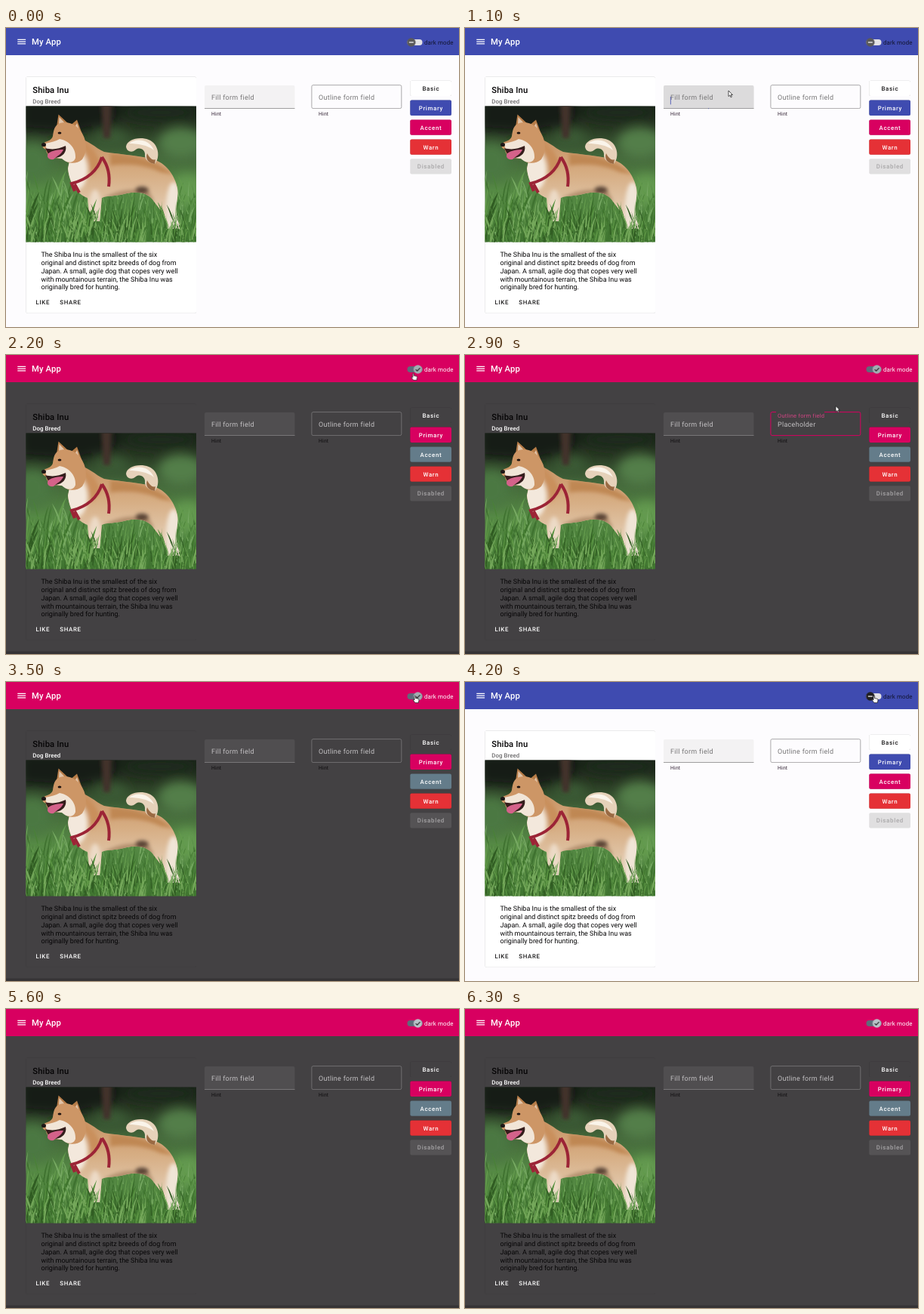
An HTML page that plays this animation: 600x396 px, repeating every 6400 ms.

```html
<!DOCTYPE html>
<html lang="en">
<head>
<meta charset="utf-8">
<title>My App</title>
<style>
html, body { margin: 0; width: 100%; height: 100%; overflow: hidden; }
svg { display: block; width: 600px; height: 396px; font-family: Roboto, sans-serif; text-rendering: geometricPrecision; }
svg, svg * { animation-duration: 6400ms; animation-iteration-count: infinite; animation-timing-function: linear; }
#app { animation-name: theme; animation-timing-function: step-end; }

@keyframes theme {
  0%, 57.8125% {
    --bar: #3f4bb0; --page: #fdfcfe; --edge: #fdfcfe; --card: #fff; --shade: rgba(0,0,0,.3); --sub: #6f6e6f; --act: #1c1b1c;
    --toggle-text: #12152f; --track: #e3e2e6; --minus: 1; --check: 0;
    --fill: #f3f2f3; --hover: #dcdbdc; --line: #969596; --label: #777677; --hint: #2a1a2c;
    --primary: #3f4bb0; --accent: #d80060; --off: #e0dfe0; --off-text: #a8a7a8;
  }
  29.6875%, 68.75% {
    --bar: #d80060; --page: #434143; --edge: #363436; --card: #434143; --shade: rgba(0,0,0,.2); --sub: #fff; --act: #fff;
    --toggle-text: #fff; --track: #5f6b7a; --minus: 0; --check: 1;
    --fill: #504e50; --hover: #5a585a; --line: #7d7b7d; --label: #c3c1c3; --hint: #0c0b0c;
    --primary: #d80060; --accent: #647c8a; --off: #555355; --off-text: #a6a4a6;
  }
}

.bar { fill: var(--bar); }
.page { fill: var(--page); }
.edge { fill: var(--edge); }
.card { fill: var(--card); filter: drop-shadow(0 .8px .6px var(--shade)); }
.h { font-size: 11.25px; font-weight: 500; letter-spacing: .14px; fill: #060506; }
.sub { font-size: 7.875px; font-weight: 500; letter-spacing: .056px; fill: var(--sub); }
.copy { font-size: 9px; fill: #060506; }
.btn { font-size: 7.875px; font-weight: 500; letter-spacing: .7px; fill: #fff; }
.btn rect { filter: drop-shadow(0 .8px .6px rgba(0,0,0,.32)); }
.btn text { text-anchor: middle; }
.act { fill: var(--act); }
.primary { fill: var(--primary); }
.accent { fill: var(--accent); }
.btn .off { fill: var(--off); filter: none; }
.off-text { fill: var(--off-text); }
.hint { font-size: 6.75px; letter-spacing: .22px; fill: var(--hint); }
.input { font-size: 9px; letter-spacing: .28px; fill: var(--label); }

.toggle-text { font-size: 7.875px; letter-spacing: .14px; fill: var(--toggle-text); }
.track { fill: var(--track); }
.thumb { animation-name: slide; }
.thumb circle { animation-name: thumb; animation-timing-function: step-end; }
.minus { opacity: var(--minus); }
.check { opacity: var(--check); }
@keyframes slide {
  0%, 29.6% { transform: translate(536.8px, 19px); }
  31.25%, 57.75% { transform: translate(545.5px, 19px); }
  59.375%, 68.7% { transform: translate(536.8px, 19px); }
  70.3125%, 100% { transform: translate(545.5px, 19px); }
}
@keyframes thumb {
  0% { fill: #5a595a; }
  26.5625% { fill: #201f22; }
  29.6875% { fill: #a3adb2; }
  57.8125% { fill: #201f22; }
  68.75% { fill: #b8c3c8; }
}

.fill-bg { fill: var(--fill); }
.fill-hover { fill: var(--hover); animation-name: hover; }
.rest-line { stroke: var(--line); fill: none; }
.ink { transform-box: fill-box; transform-origin: center; fill: #3f4bb0; animation-name: ink; }
.fill-label { animation-name: float-fill; }
.fill-label text { animation-name: tint-fill; }
.fill-caret { fill: #3f4bb0; animation-name: caret-fill; animation-timing-function: step-end; }
.fill-ph { animation-name: ph-fill; }
@keyframes hover { 0%, 14.4% { opacity: 0; } 15.625%, 21.875% { opacity: 1; } 23.4375%, 100% { opacity: 0; } }
@keyframes ink {
  0%, 17.1875% { transform: scaleX(0); opacity: 1; }
  20%, 28.2% { transform: scaleX(1); opacity: 1; }
  29.6%, 100% { transform: scaleX(1); opacity: 0; }
}
@keyframes float-fill {
  0%, 17.1875% { transform: translate(272px, 94.6px); }
  19.53%, 27.11% { transform: translate(272px, 86.5px) scale(.75); }
  29.45%, 100% { transform: translate(272px, 94.6px); }
}
@keyframes tint-fill {
  0%, 17.1875% { fill: var(--label); }
  19.53%, 27.11% { fill: #3f4bb0; }
  28.1%, 100% { fill: var(--label); }
}
@keyframes caret-fill { 0% { opacity: 0; } 17.1875% { opacity: 1; } 25% { opacity: 0; } }
@keyframes ph-fill { 0%, 18% { opacity: 0; } 20%, 26.9% { opacity: 1; } 28%, 100% { opacity: 0; } }

.rest-box { animation-name: rest-box; animation-timing-function: step-end; }
.focus-box { stroke: #d80060; fill: none; animation-name: focus-box; animation-timing-function: step-end; }
.out-label { animation-name: float-out; }
.out-label text { animation-name: tint-out; }
.out-caret { fill: #d80060; animation-name: focus-caret; animation-timing-function: step-end; }
.out-ph { animation-name: ph-out; }
@keyframes rest-box { 0% { opacity: 1; } 40.625% { opacity: 0; } 46.875% { opacity: 1; } }
@keyframes focus-box { 0% { opacity: 0; } 40.625% { opacity: 1; } 46.875% { opacity: 0; } }
@keyframes focus-caret { 0% { opacity: 0; } 40.625% { opacity: 1; } 44.5% { opacity: 0; } }
@keyframes float-out {
  0%, 39.0625% { transform: translate(414px, 94.6px); }
  41.4%, 44.5% { transform: translate(414px, 77.2px) scale(.75); }
  46.84%, 100% { transform: translate(414px, 94.6px); }
}
@keyframes tint-out {
  0%, 39.0625% { fill: var(--label); }
  41.4%, 44.5% { fill: #d80060; }
  46.84%, 100% { fill: var(--label); }
}
@keyframes ph-out { 0%, 39.5% { opacity: 0; } 41.4%, 45.4% { opacity: 1; } 46.8%, 100% { opacity: 0; } }

.cursor { animation-name: move; animation-timing-function: ease-in-out; }
.cursor path { fill: #fff; stroke: #111; stroke-width: .7; stroke-linejoin: round; animation-timing-function: step-end; }
.arrow { animation-name: arrow; }
.hand { animation-name: hand; }
@keyframes move {
  0%, 9.375% { transform: translate(400px, -14px); }
  15.625%, 20.3125% { transform: translate(349px, 83px); }
  26.5625%, 33% { transform: translate(546px, 15.5px); }
  39.0625%, 41% { transform: translate(478px, 92px); }
  44%, 46.875% { transform: translate(491px, 67.5px); }
  54.6875%, 70.3125% { transform: translate(541px, 18px); }
  76.5625%, 100% { transform: translate(530px, -16px); }
}
@keyframes arrow { 0% { opacity: 1; } 25.6% { opacity: 0; } 34.6% { opacity: 1; } 54% { opacity: 0; } 72.4% { opacity: 1; } }
@keyframes hand { 0% { opacity: 0; } 25.6% { opacity: 1; } 34.6% { opacity: 0; } 54% { opacity: 1; } 72.4% { opacity: 0; } }
</style>
</head>
<body>
<svg id="app" viewBox="0 0 600 396">
  <defs>
    <clipPath id="frame"><rect x="26.5" y="103.5" width="225.5" height="180"/></clipPath>
    <filter id="soft" x="-50%" y="-50%" width="200%" height="200%"><feGaussianBlur stdDeviation="7"/></filter>
    <filter id="fuzz" x="-30%" y="-30%" width="160%" height="160%"><feGaussianBlur stdDeviation="2.4"/></filter>
    <filter id="fur" x="-10%" y="-10%" width="120%" height="120%"><feGaussianBlur stdDeviation=".6"/></filter>
    <linearGradient id="woods" x2="0" y2="1">
      <stop stop-color="#182016"/><stop offset=".16" stop-color="#273722"/><stop offset=".36" stop-color="#43663a"/>
      <stop offset=".62" stop-color="#568a45"/><stop offset="1" stop-color="#3f7430"/>
    </linearGradient>
    <linearGradient id="coat" x2="0" y2="1">
      <stop stop-color="#c89263"/><stop offset=".4" stop-color="#d6ad83"/><stop offset=".7" stop-color="#e0c4a6"/><stop offset="1" stop-color="#e9dccb"/>
    </linearGradient>
    <clipPath id="body"><path d="M90 148C106 144 116 158 130 164C155 168 180 169 198 175C214 181 224 197 227 212C229 226 223 236 226 248L233 266H214C213 248 203 240 194 227C187 219 176 216 160 219C146 223 133 222 127 225L124 256H111L108 225C94 220 84 206 82 186Z"/></clipPath>
  </defs>

  <rect class="page" width="600" height="396"/>
  <rect class="edge" y="392.5" width="600" height="3.5"/>
  <rect class="bar" width="600" height="36"/>
  <path d="M15.3 15.3h10.8M15.3 18.1h10.8M15.3 20.9h10.8" stroke="#fff" stroke-width="1.2"/>
  <text class="h" x="34" y="22.2" style="fill:#fff">My App</text>

  <rect class="track" x="531.5" y="15" width="20" height="8" rx="4"/>
  <g class="thumb">
    <circle r="5.7"/>
    <path class="minus" d="M-3 0H3" stroke="#fff" stroke-width="1.2"/>
    <path class="check" d="M-2.8 .2L-.9 2.1L3-1.9" fill="none" stroke="#222" stroke-width="1.1"/>
  </g>
  <text class="toggle-text" x="554" y="21.8">dark mode</text>

  <rect class="card" x="26.5" y="64.5" width="225.5" height="313.3" rx="2"/>
  <text class="h" x="35.3" y="86.3">Shiba Inu</text>
  <text class="sub" x="35.3" y="100.3">Dog Breed</text>

  <g clip-path="url(#frame)">
    <rect x="26" y="103" width="227" height="181" fill="url(#woods)"/>
    <g filter="url(#soft)">
      <path d="M20 95H150V122L90 140L20 135Z" fill="#141a14"/>
      <ellipse cx="205" cy="112" rx="50" ry="12" fill="#1f2c1b"/>
      <ellipse cx="232" cy="152" rx="30" ry="20" fill="#527e49"/>
      <ellipse cx="35" cy="178" rx="24" ry="26" fill="#4c7842"/>
      <ellipse cx="140" cy="146" rx="22" ry="12" fill="#3a5a34"/>
      <ellipse cx="240" cy="215" rx="22" ry="22" fill="#639a4f"/>
    </g>
    <path d="M126 100H140L138 146H129Z" fill="#43302a" filter="url(#fuzz)"/>
    <g id="back"></g>
    <g filter="url(#fur)">
      <g clip-path="url(#body)">
        <rect x="80" y="143" width="155" height="125" fill="url(#coat)"/>
        <g filter="url(#fuzz)">
          <ellipse cx="93" cy="188" rx="15" ry="27" fill="#f3e8dc"/>
          <ellipse cx="118" cy="238" rx="8" ry="24" fill="#ecdac6"/>
          <path d="M128 226C148 214 170 211 190 217L196 230Z" fill="#b18d6c"/>
          <path d="M138 166C170 167 200 175 222 194L205 191C185 181 160 179 138 182Z" fill="#bf8752"/>
          <path d="M104 150C114 158 122 168 126 180L112 196C112 178 108 164 100 156Z" fill="#c98f5c"/>
          <ellipse cx="222" cy="238" rx="10" ry="34" fill="#f0e5d7"/>
          <ellipse cx="180" cy="215" rx="9" ry="5" fill="#584334"/>
        </g>
      </g>
      <path d="M197 180C205 171 202 153 189 148C176 143 160 148 159 157C160 165 168 165 172 161C178 157 185 162 184 169C184 174 189 179 197 180Z" fill="#e6d2ba"/>
      <path d="M163 153C172 145 190 147 196 162C188 155 174 153 163 153Z" fill="#faf4ea"/>
      <path d="M187 166C190 172 194 176 198 174L197 180C189 179 184 174 187 166Z" fill="#9a6a43"/>
      <path d="M67 131L69.5 114.5L83 127ZM84 130L94 121.5L103 146Z" fill="#b67c48"/>
      <path d="M70 127L70.5 118L78 126ZM90 133L94 126L99 141Z" fill="#e0c3a8"/>
      <path d="M68 128C76 122 90 125 98 135C107 147 109 162 101 174C92 182 80 179 75 173L60 172C55 168 53 164 53 161C47 159 47 153 52 151C58 149 61 147 62 143C63 136 64 131 68 128Z" fill="#cd9666"/>
      <path d="M52 153C60 151 66 150 71 147C82 149 93 158 92 172C89 181 79 178 74 173L60 171L54 162Z" fill="#f1e5d7"/>
      <path d="M52 159C62 162 70 160 79 156C81 164 75 171 66 172L58 171Z" fill="#351d1c"/>
      <path d="M56 166C61 162 70 161 76 161C74 167 68 169 63 174C57 175 53 171 56 166Z" fill="#d4628a"/>
      <ellipse cx="50" cy="154.5" rx="3" ry="2.6" fill="#1d1716"/>
      <ellipse cx="71" cy="139" rx="2.4" ry="1.5" fill="#1d1310"/>
      <path d="M127 171C121 190 106 201 87 206L91 216M127 171C135 182 138 196 136 210M91 207L97 218" fill="none" stroke="#9c2436" stroke-width="4"/>
    </g>
    <g id="front"></g>
  </g>

  <g class="copy">
    <text x="46.5" y="303.4">The Shiba Inu is the smallest of the six</text>
    <text x="46.5" y="314.1">original and distinct spitz breeds of dog from</text>
    <text x="46.5" y="324.8">Japan. A small, agile dog that copes very well</text>
    <text x="46.5" y="335.5">with mountainous terrain, the Shiba Inu was</text>
    <text x="46.5" y="346.2">originally bred for hunting.</text>
  </g>
  <g class="btn">
    <text class="act" x="39.5" y="366.2" style="text-anchor:start">LIKE</text>
    <text class="act" x="71.2" y="366.2" style="text-anchor:start">SHARE</text>
  </g>

  <path class="fill-bg" d="M263 107V78q0-2 2-2h115.5q2 0 2 2v29Z"/>
  <path class="fill-hover" d="M263 107V78q0-2 2-2h115.5q2 0 2 2v29Z"/>
  <path class="rest-line" d="M263 106.5H382.5" stroke-width=".9"/>
  <rect class="ink" x="263" y="106" width="119.5" height="1.2"/>
  <g class="fill-label"><text class="input">Fill form field</text></g>
  <text class="input fill-ph" x="272" y="99.7">Placeholder</text>
  <rect class="fill-caret" x="271.9" y="91" width=".8" height="10.3"/>
  <text class="hint" x="272" y="116.2">Hint</text>

  <rect class="rest-line rest-box" x="404.9" y="75.6" width="118.9" height="31" rx="2" stroke-width=".8"/>
  <path class="focus-box" d="M412 75.6H406.9q-2 0-2 2V104.6q0 2 2 2H521.8q2 0 2-2V77.6q0-2-2-2H476" stroke-width="1"/>
  <g class="out-label"><text class="input">Outline form field</text></g>
  <text class="input out-ph" x="414" y="94.6">Placeholder</text>
  <rect class="out-caret" x="413.6" y="86.4" width=".8" height="10.3"/>
  <text class="hint" x="414" y="116.2">Hint</text>

  <g class="btn">
    <rect class="card" x="535.3" y="69.7" width="54.7" height="20.3" rx="2"/><text class="act" x="562.9" y="82.8">Basic</text>
    <rect class="primary" x="535.3" y="95.6" width="54.7" height="20.3" rx="2"/><text x="562.9" y="108.7">Primary</text>
    <rect class="accent" x="535.3" y="121.5" width="54.7" height="20.3" rx="2"/><text x="562.9" y="134.6">Accent</text>
    <rect x="535.3" y="147.4" width="54.7" height="20.3" rx="2" fill="#e53136"/><text x="562.9" y="160.5">Warn</text>
    <rect class="off" x="535.3" y="173.3" width="54.7" height="20.3" rx="2"/><text class="off-text" x="562.9" y="186.3">Disabled</text>
  </g>

  <g class="cursor">
    <path class="arrow" d="M0 0V7.6L1.8 6L3.1 8.8L4.4 8.2L3.1 5.5H5.5Z"/>
    <path class="hand" d="M0 .8Q.8-.4 1.6 .8V3.6L5 4.2Q6.2 4.5 6 5.8L5.3 9.6H1L-2 5.9Q-1.6 4.8 0 6Z"/>
  </g>
</svg>
<script>
let seed = 11;
const rand = () => (seed = seed * 16807 % 2147483647) / 2147483647;

// Blades rooted between two heights, grouped into one path per colour.
function grass(id, count, top, bottom, tall, colors) {
  const paths = colors.map(() => '');
  for (let i = 0; i < count; i++) {
    const x = 22 + rand() * 234, y = top + rand() * (bottom - top);
    const h = tall * (.5 + rand()) * (x < 110 ? 1.3 : 1), lean = (rand() - .5) * h * .8;
    paths[i % colors.length] += `M${x} ${y}q${lean * .2} ${-h * .6} ${lean} ${-h}q${-lean * .5} ${h * .5} ${1.6 - lean} ${h}Z`;
  }
  document.getElementById(id).innerHTML = paths.map((d, i) => `<path d="${d}" fill="${colors[i]}"/>`).join('');
}
grass('back', 360, 222, 290, 22, ['#4a8038', '#639a4c', '#3f7230', '#76a862']);
grass('front', 420, 262, 296, 24, ['#3f752d', '#5a9342', '#305c22', '#74a75a']);
</script>
</body>
</html>
```
